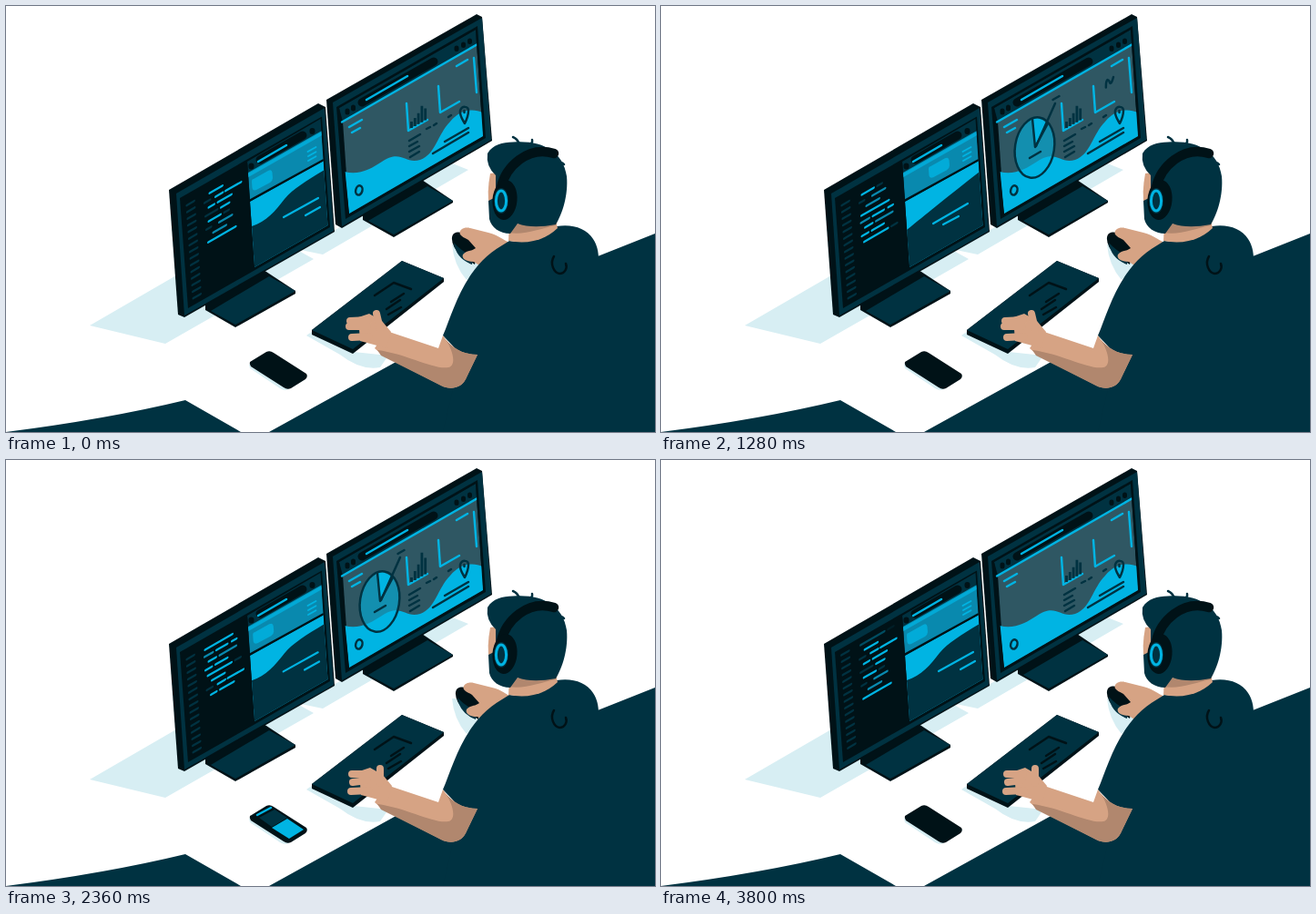
These frames come from a looping animation (713x468 px, 3840 ms). An HTML page:

```html
<!DOCTYPE html>
<html lang="en">
<head>
<meta charset="utf-8">
<title>Developer at work</title>
<style>
  html, body { margin: 0; width: 100%; height: 100%; overflow: hidden; background: #fff; }
  svg { display: block; width: 713px; height: 468px; }
  .navy { fill: #003241; } .ink { fill: #001217; } .cyan { fill: #00b4e3; }
  .teal { fill: #0989ae; } .slate { fill: #2f5763; } .shade { fill: #d7eef3; }
  .skin { fill: #d6a384; } .tan { fill: #b1876e; }
  .line { fill: none; stroke-width: 2.5; stroke-linecap: round; stroke-linejoin: round; }
  .n { stroke: #003241; } .k { stroke: #001217; } .c { stroke: #00b4e3; }
  .m { stroke: #0989ae; } .s { stroke: #d6a384; }
</style>
</head>
<body>
<svg viewBox="0 0 713 468">
  <defs>
    <clipPath id="codeClip"><path d="M192 210L266 168L273 290L200 332Z"/></clipPath>
    <clipPath id="pageClip"><path d="M265 171L345.500 124L353.500 241L273 287Z"/></clipPath>
    <clipPath id="rightClip"><path d="M366 112L516 26L524 143L377 228Z"/></clipPath>
  </defs>

  <!-- desk -->
  <path class="shade" d="M92 351L187 296L320 268L338 278L175 371ZM324 268L348 273L508 180L488 172Z"/>
  <path class="navy" d="M0 468Q110 454 197 433L258 468ZM289 468L432 389L480 400L645 277L713 250V468Z"/>

  <!-- left monitor -->
  <path class="ink" d="M219 327L283 290L318 313V316L252 353L219 334Z"/>
  <path class="navy" d="M225 335L289 297L318 313L252 350Z"/>
  <path class="ink" d="M179 202L343 107L351 111L361 248L196 342L189 339Z"/>
  <path class="navy" d="M187 206L350 112L360 247L196 340Z"/>
  <path class="ink" d="M191 211L347 121.500L356 243L200 332Z"/>
  <g clip-path="url(#codeClip)">
    <g id="code" class="line" transform="matrix(1 -.573 .07 1 218 213)"></g>
  </g>
  <g clip-path="url(#pageClip)">
    <path class="navy" d="M265 170L346 123L347 138L266 184Z"/>
    <path class="line k" style="stroke-width:9" d="M279 169L326 142"/>
    <path class="line c" d="M277 171L308 153"/>
    <path class="line k" style="stroke-width:6" d="M269.500 175.500v1M336.500 137v1"/>
    <path class="teal" d="M266 184L347 138L349 169L268 213Z"/>
    <path class="cyan" d="M266 183L347 137L347.200 142L266.300 188Z" opacity=".75"/>
    <path class="line c" style="stroke-width:1.8" d="M331.500 160l9-5M332 165l8.500-4.800M332 170l8.500-4.800"/>
    <path id="button" class="cyan" opacity=".8" d="M272 190Q270 190 270 193L270.500 200Q271 203.500 275 202L290 194Q293 192 293 189L292.500 183Q292 179 288 181Z"/>
    <path class="cyan" d="M268 215L349 170L354 243L273 288Z"/>
    <path id="hill" class="navy"/>
    <path class="line k" style="stroke-width:2" d="M267 214L349 169"/>
    <path id="caption" class="line c" style="stroke-width:2.200"/>
  </g>

  <!-- right monitor -->
  <path class="ink" d="M392 229L457 191L491 214V216L426 254L392 235Z"/>
  <path class="navy" d="M398 236L463 198L491 214L426 251Z"/>
  <path class="ink" d="M352 103L517 9L523 12L534 148L369 244L362 240Z"/>
  <path class="navy" d="M359 106L523 13L533 147L369 242Z"/>
  <path class="ink" d="M363 111L518 22L527 145L373 234Z"/>
  <g clip-path="url(#rightClip)">
    <path class="navy" d="M366 112L516 26L517 42L370 127Z"/>
    <path class="line k" style="stroke-width:9" d="M391 106L470 61"/>
    <path class="line c" d="M396 103L441 77"/>
    <path class="line k" style="stroke-width:5" d="M375 115v2M381.500 111v2M495 46v1.500M502.500 42v1.500M509.500 38v1.500"/>
    <path class="slate" d="M370 127L517 42L524 143L377 228Z"/>
    <path class="line c" d="M369 127.500L518 42"/>
    <path class="cyan" d="M372 182C388 186 401 179 413 171C434 157 438 174 455 169C472 163 474 141 488 127C499 114 512 112 524 117V144L377 229Z"/>
    <path class="line c" d="M377 133l14-8M380 139l9-5M495 66l12-7M514 57l3 38M440 107l2 30l21-12M475 88l2 29l21-12"/>
    <path class="line n" d="M443 148l12-7M443 154l9-5M443 160l11-6M444 166l10-6M462 135l4-2M470 131l3-2M486 122l3-2M469 162l39-23M482 149l26-15"/>
    <path class="line n" d="M504 129C501 124 498 120 499 115C501 109 508 110 508 115C508 120 506 125 504 129ZM503.500 115v2"/>
    <ellipse class="line n" cx="388" cy="202.500" rx="3.600" ry="5.200" transform="rotate(15 388 202)"/>
    <path id="bars" class="line n" style="stroke-width:2.800;stroke-linecap:butt"/>
    <path id="trend" class="line n" pathLength="100" d="M482 103C483 99 485 101 486 105C487 110 488 104 488.500 98L489 85C490 79 492 81 493 84C494 87 496 82 497 78"/>
    <g id="pie">
      <ellipse class="cyan" opacity=".6" cx="410.500" cy="155.500" rx="21.500" ry="33.500" transform="rotate(9 410.500 155.500)"/>
      <path class="cyan" d="M411 155L408 124Q415 121 424 129Z"/>
      <ellipse class="line n" cx="410.500" cy="155.500" rx="21.500" ry="33.500" transform="rotate(9 410.500 155.500)"/>
      <path class="line n" d="M408 124L411 155L425 129M405 167l12-7"/>
    </g>
    <path id="pointer" class="line n" pathLength="100" d="M412 154L433 107"/>
    <path id="label" class="line n"/>
  </g>

  <!-- keyboard and phone -->
  <path class="shade" d="M330 362L340 355L382 380L420 384L411 397Q390 401 367 383Z"/>
  <path class="ink" d="M336 356L435 280L481 299V303L381 382L336 361Z"/>
  <path class="navy" d="M336 356L435 280L481 299L381 377Z"/>
  <path class="line k" d="M405 318L426 304L445 311M423 325l14-9M418 333l15-10M420 339l14-8"/>
  <path class="shade" d="M267 394L290 382L329 409L308 422Q303 422 298 418L268 398Z"/>
  <path class="ink" d="M268 391L286 380Q290 378 294 381L330 404Q332 407 329 410L313 420Q309 422 305 419L269 396Q267 393 268 391Z"/>
  <g id="phone">
    <path class="navy" d="M278 393L295 384L309 393L292 403Z"/>
    <path class="cyan" d="M292 404L309 394L327 406L311 416Z"/>
    <path class="line c" d="M276 390L291 382"/>
  </g>

  <!-- mouse hand -->
  <path class="shade" d="M490 262Q492 285 506 301L525 283L505 262Z"/>
  <g id="mouseHand">
    <path class="ink" d="M490 254C491 247 500 247 507 252L519 264L515 284L500 274Q489 264 490 254Z"/>
    <path class="navy" d="M492 260Q501 270 513 275L512 284Q494 277 492 260Z"/>
    <path class="skin" d="M560 263C545 257 540 251 530 249L510 244C502 242 497 247 499 251C501 254 505 255 508 257L516 266C511 270 506 268 502 273C500 278 506 281 514 281L520 285L550 275Z"/>
  </g>

  <!-- person -->
  <path class="navy" d="M553 258C573 262 592 255 605 242C630 238 650 250 651 276V282L713 251V468H480L500 383L480 362C492 335 502 288 545 263Z"/>
  <path class="skin" d="M418 357L475 376L480 362C488 374 500 383 518 383L505 410C500 420 488 422 478 417L414 384L405 376Z"/>
  <path class="tan" d="M408 378C440 382 470 400 486 397C495 395 492 379 481 363C488 374 500 383 518 383L505 410C500 420 488 422 478 417L412 384Z"/>
  <path class="skin" d="M532 184L540 183L542 216L531 220Q528 205 532 184Z"/>
  <path class="skin" d="M553 240L604 236L606 244C592 258 572 262 552 258Z"/>
  <path class="tan" d="M552 240L606 236L604 241C585 245 570 252 552 249Z"/>
  <path class="navy" d="M529 162C535 152 545 150 557 149.500C588 147 612 159 616 187C618 208 611 229 604 240Q578 245 562 239L554 250C542 250 533 243 531 234L530 214L538 210L538 186Q527 176 529 162Z"/>
  <path class="line n" d="M564 152Q562 146 557 144M574 153Q579 151 578 147M606 174Q610 170 613 174"/>
  <path class="line k" style="stroke-width:10.500" d="M544 199C549 177 573 153 602 162"/>
  <ellipse class="ink" cx="548" cy="213" rx="13.500" ry="22" transform="rotate(5 548 213)"/>
  <ellipse class="navy" cx="544" cy="214" rx="8" ry="14"/>
  <ellipse class="line c" style="stroke-width:3" cx="544" cy="214" rx="5.600" ry="11"/>
  <path class="line k" d="M602 275C597 283 602 293 608 294C614 294 617 288 615 283"/>

  <!-- typing hand -->
  <path id="palm" class="skin" d="M387 342L399 338L413 346L423 358L418 376L404 372L389 368Z"/>
  <path id="fingers" class="line s" style="stroke-width:8"/>
</svg>

<script>
const LOOP = 3840, HALF = LOOP / 2, ROWS = 12, PITCH = 7.3;
const el = id => document.getElementById(id);
const clamp = x => Math.min(1, Math.max(0, x));
const ease = (t, from, to) => { const x = clamp((t - from) / (to - from)); return x * x * (3 - 2 * x); };
const pulse = (t, a, b, c, d) => ease(t, a, b) - ease(t, c, d);
const blend = (a, b, k) => a.map((v, i) => (v + (b[i] - v) * k).toFixed(2));
const set = (id, name, value) => el(id).setAttribute(name, value);

// Code rows: start-end and colour of each stroke.
const rows = [
  '6-20c', '0-6n 12-20c 23-40c', '4-10c 14-29c', '0-13n 17-26c', '3-16c 20-25n', '0-5n 14-28m',
  '7-21m', '1-31c', '0-9m 13-25c 30-35c', '4-12c 16-34m', '0-7c 11-24c', '2-28c 32-38n'
].map(row => row.split(' ').map(s => [parseInt(s), parseInt(s.split('-')[1]), s.slice(-1)]));

function drawCode(t) {
  const raw = t / LOOP * ROWS, step = Math.floor(raw);
  const scroll = step + ease(raw - step, .7, 1);
  let out = '';
  const dash = (a, b, y, colour, alpha = 1) =>
    out += `<path class="${colour}" opacity="${alpha}" d="M${a} ${y}H${b}"/>`;
  rows.forEach((row, i) => {
    let slot = (i - scroll + ROWS) % ROWS;
    if (slot > ROWS - 1) slot -= ROWS;
    const alpha = clamp(1 + slot), end = 42 * clamp(8 - (i - raw + ROWS) % ROWS);
    for (const [a, b, colour] of row) {
      const stop = slot > 6.9 ? Math.min(b, end) : b;
      if (slot < 8 && stop > a) dash(a, stop, slot * PITCH - 4, colour, alpha);
    }
  });
  for (let i = 0; i < 15; i++) dash(-19, -11, (i - scroll % 1) * PITCH - 5, 'n');
  el('code').innerHTML = out;
}

function drawPage(t) {
  const k = pulse(t % HALF, 400, 700, 1300, 1480);
  const h = blend([270, 242, 286, 237, 296, 225, 306, 212, 315, 201, 330, 192, 350, 180],
                  [270, 246, 282, 236, 291, 229, 302, 220, 317, 208, 333, 195, 350, 182], k);
  set('hill', 'd', `M${h[0]} ${h[1]}C${h.slice(2)}L355 243L273 288Z`);
  set('button', 'transform', `translate(${24 * k} ${-13.7 * k})`);
  const p = blend([305, 232, 343, 211, 329, 230, 345, 221], [299, 239, 337, 217, 310, 240, 327, 231], k);
  set('caption', 'd', `M${p.slice(0, 2)}L${p.slice(2, 4)}M${p.slice(4, 6)}L${p.slice(6)}`);
}

function drawCharts(t) {
  const pie = pulse(t, 80, 480, 3240, 3540);
  const pointer = pulse(t, 360, 600, 3080, 3280);
  const label = pulse(t, 840, 1040, 3000, 3160);
  set('pie', 'transform', `translate(411 156) scale(${pie}) translate(-411 -156)`);
  set('pointer', 'stroke-dasharray', `${100 * pointer} 200`);
  set('pointer', 'opacity', +(pointer > .02));
  set('label', 'd', `M430.500 103l${7 * label} ${-4 * label}`);
  set('label', 'opacity', +(t > 800 && t < 3160));

  const grow = pulse(t, 1450, 1850, 2900, 3250);
  const heights = [7, 9, 12, 18, 13], gains = [-2, 1, 3, 8, 5];
  set('bars', 'd', heights.map((v, i) =>
    `M${445.5 + i * 3.8} ${134 - i * 2.1}v${-(v + gains[i] * grow)}`).join(''));

  const phase = t % HALF;
  const head = 100 * ease(phase, 580, 1120), tail = 100 * ease(phase, 860, 1640);
  set('trend', 'stroke-dasharray', `${Math.max(0, head - tail)} 200`);
  set('trend', 'stroke-dashoffset', -tail);
  set('trend', 'opacity', +(head - tail > .5));
}

function drawHands(t) {
  const move = pulse(t, 420, 780, 900, 1200) + pulse(t, 2040, 2280, 2380, 2680);
  set('mouseHand', 'transform', `translate(${4 * move} ${move})`);
  const tap = pulse(t % 240, 84, 120, 200, 240);
  const f = blend([378, 346, 377, 352, 380, 364, 407, 338], [380, 345, 381, 354, 379, 364, 411, 339], tap);
  set('fingers', 'd', `M398 345L${f.slice(0, 2)}M397 352L${f.slice(2, 4)}M399 363L${f.slice(4, 6)}M411 355L${f.slice(6)}`);
  set('palm', 'transform', `translate(${tap} 0)`);
}

function frame() {
  const t = performance.now() % LOOP;
  drawCode(t);
  drawPage(t);
  drawCharts(t);
  drawHands(t);
  set('phone', 'opacity', pulse(t, 1360, 1480, 3520, 3640));
  requestAnimationFrame(frame);
}
frame();
</script>
</body>
</html>
```
